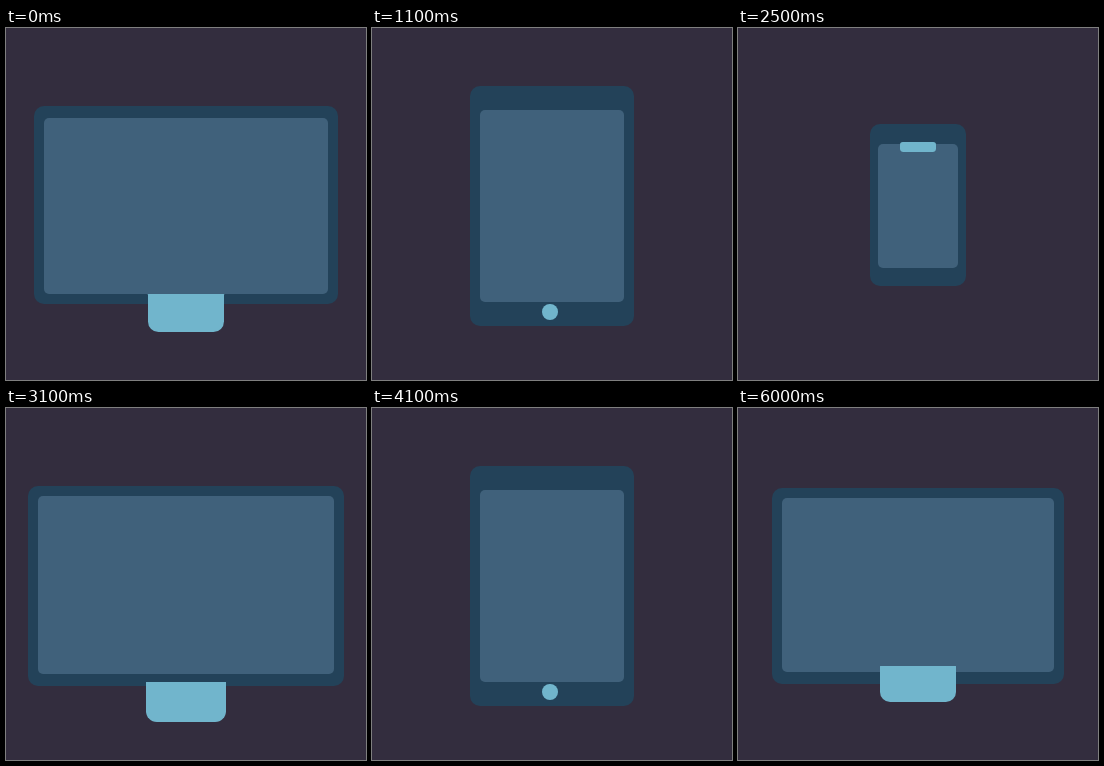
Animation, 360 px wide and 352 px high, one loop 6100 ms. Source, as an HTML page with a canvas:

```html
<!DOCTYPE html>
<html lang="en">
<head>
<meta charset="utf-8">
<title>Responsive devices</title>
<style>
  html, body { margin: 0; width: 100%; height: 100%; overflow: hidden; background: #332d3e; }
  canvas { display: block; }
</style>
</head>
<body>
<canvas id="stage" width="360" height="352"></canvas>
<script>
const ctx = document.getElementById('stage').getContext('2d');
const LOOP = 6100;
const CX = 180, CY = 177.5;

// w, h: body; ix, iy: bezel; bx, by, bw, bh: stand or button; rt, rb: its top and bottom radii
const monitor = { w: 320, h: 200, ix: 10, iy: 10, bx: 180, by: 277.4, bw: 80, bh: 40, rt: 0, rb: 11 };
const tablet = { w: 160, h: 240, ix: 10, iy: 24, bx: 178, by: 276, bw: 16, bh: 16, rt: 8, rb: 8 };
const phone = { w: 80, h: 160, ix: 8, iy: 20, bx: 180, by: 104, bw: 32, bh: 8, rt: 3, rb: 3 };

// start, duration, from, to
const steps = [
  [-548, 800, phone, monitor],
  [455, 800, monitor, tablet],
  [1450, 800, tablet, phone],
  [2440, 800, phone, monitor],
  [3450, 800, monitor, tablet],
  [4434, 800, tablet, phone],
  [5490, 850, phone, monitor]
];

const bezier = (a, b, u) => 3 * a * u * (1 - u) ** 2 + 3 * b * u * u * (1 - u) + u ** 3;

// CSS "ease"
function ease(x) {
  if (x <= 0) return 0;
  if (x >= 1) return 1;
  let lo = 0, hi = 1;
  for (let i = 0; i < 24; i++) {
    const mid = (lo + hi) / 2;
    if (bezier(0.25, 0.25, mid) < x) lo = mid; else hi = mid;
  }
  return bezier(0.1, 1, lo);
}

function poseAt(t) {
  const [start, duration, from, to] = steps.filter(s => s[0] <= t).pop();
  const p = ease((t - start) / duration);
  const pose = {};
  for (const key in from) pose[key] = from[key] + (to[key] - from[key]) * p;
  return pose;
}

// Edges sit on a two-pixel grid
const snap = v => 2 * Math.round(v / 2);

function box(cx, top, w, h, radii, color) {
  const x = snap(cx - w / 2), y = snap(top);
  ctx.fillStyle = color;
  ctx.beginPath();
  ctx.roundRect(x, y, snap(cx + w / 2) - x, snap(top + h) - y, radii);
  ctx.fill();
}

function draw(t) {
  const d = poseAt(t);
  const top = CY - d.h / 2;
  ctx.fillStyle = '#332d3e';
  ctx.fillRect(0, 0, 360, 352);
  box(CX, top, d.w, d.h, 10, '#234259');
  box(CX, top + d.iy, d.w - 2 * d.ix, d.h - 2 * d.iy, 5, '#40617b');
  box(d.bx, d.by, d.bw, d.bh, [d.rt, d.rt, d.rb, d.rb], '#71b5cc');
}

const origin = performance.now();
function tick() {
  draw((performance.now() - origin) % LOOP);
  requestAnimationFrame(tick);
}
tick();
</script>
</body>
</html>
```
